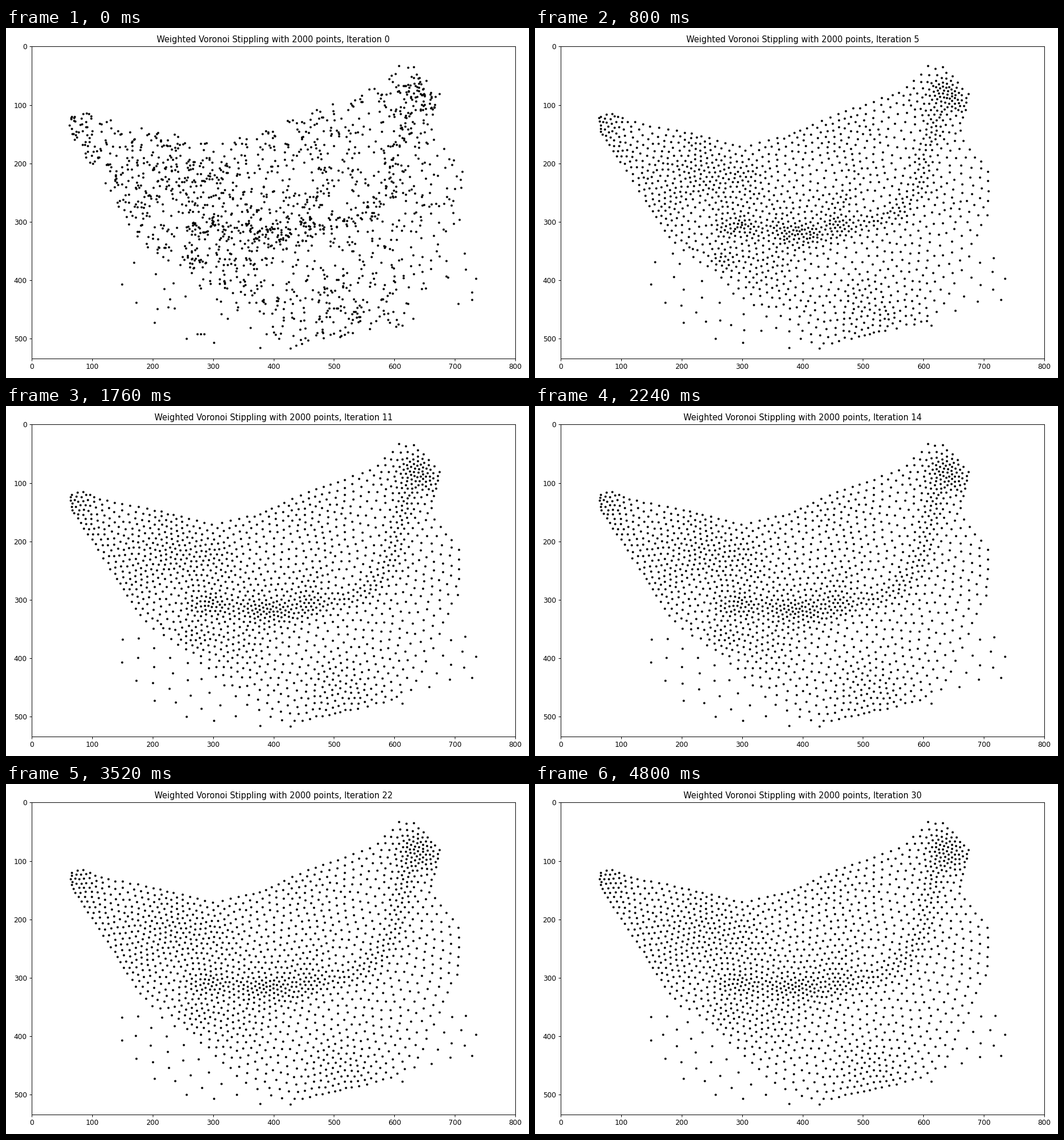
A matplotlib script for the animation above (4960 ms loop, 916 px wide and 612 px high).

```python
import numpy as np
import matplotlib.pyplot as plt
from matplotlib.animation import FuncAnimation
from matplotlib.path import Path

W, H, DPI = 916, 612, 87
COLS, ROWS = 800, 534
DOTS, STEPS, TILE = 1580, 31, 26

# Dots on the convex hull have unbounded cells and never move
HULL = [(66, 141), (66, 120), (85, 115), (607, 33), (632, 35), (674, 81),
        (735, 397), (728, 433), (613, 477), (428, 516), (378, 515), (301, 507),
        (256, 500), (203, 472), (173, 438), (149, 407)]
BODY = [(62, 145), (62, 116), (85, 111), (110, 122), (163, 132), (220, 146),
        (300, 166), (381, 146), (454, 111), (564, 70), (607, 29), (636, 31),
        (678, 80), (665, 150), (714, 212), (712, 290), (640, 445), (600, 474),
        (428, 518), (345, 480), (255, 386), (180, 336)]
SPINE = [(270, 311), (440, 316), (530, 296), (575, 262), (600, 215), (613, 150), (625, 70)]
# x, y, spread, weight
SPOTS = [(642, 82, 20, 15), (88, 130, 20, 4), (195, 240, 50, 2.5), (275, 358, 22, 6),
         (345, 395, 40, 3.5), (500, 462, 38, 4), (425, 312, 30, 2.5)]


def bell(d2, spread):
    return np.exp(-d2 / (2 * spread ** 2))


def fade(t, edge, soft):
    return 1 / (1 + np.exp((t - edge) / soft))


def density():
    """Pixels inside the shape and how dark each one is."""
    y, x = np.mgrid[:ROWS, :COLS]
    xy = np.column_stack([x.ravel(), y.ravel()]).astype(float)
    body = Path(BODY).contains_points(xy)
    skirt = Path(HULL).contains_points(xy) & (xy[:, 1] > 350)
    keep = body | skirt
    xy, body = xy[keep], body[keep]
    x, y = xy.T

    tone = 2.5 + 2.6 * fade(x, 480, 20) * fade(y, 335, 10)
    for cx, cy, spread, weight in SPOTS:
        tone += weight * bell((x - cx) ** 2 + (y - cy) ** 2, spread)
    t = np.linspace(0, len(SPINE) - 1, 70)
    d2 = np.full(len(xy), np.inf)
    for px, py in zip(*(np.interp(t, range(len(SPINE)), c) for c in zip(*SPINE))):
        d2 = np.minimum(d2, (x - px) ** 2 + (y - py) ** 2)
    tone += 7.5 * bell(d2, 11)
    return xy, np.where(body, tone, 0.55)


def split(xy, rho):
    """Sort the pixels into square tiles with a centre and radius."""
    key = (xy // TILE) @ (1, 100)
    tiles = []
    for k in np.unique(key):
        i = key == k
        mid = xy[i].mean(0)
        tiles.append((xy[i], rho[i], mid, np.hypot(*(xy[i] - mid).T).max()))
    return tiles


def relax(pts, tiles):
    """Move each free dot to the weighted centroid of its Voronoi cell."""
    mass = np.zeros((3, len(pts)))
    for xy, rho, mid, rad in tiles:
        d = np.hypot(*(pts - mid).T)
        near = np.flatnonzero(d <= d.min() + 2 * rad)
        q = pts[near] - mid
        own = ((q ** 2).sum(1) - 2 * (xy - mid) @ q.T).argmin(1)
        for row, w in zip(mass, (rho, rho * xy[:, 0], rho * xy[:, 1])):
            row[near] += np.bincount(own, w, len(near))
    new = pts.copy()
    free = mass[0] > 0
    free[:len(HULL)] = False
    new[free] = (mass[1:, free] / mass[0, free]).T
    return new


rng = np.random.default_rng(7)
xy, rho = density()
tiles = split(xy, rho)
pick = rng.choice(len(xy), DOTS - len(HULL), replace=False, p=rho / rho.sum())
states = [np.vstack([HULL, xy[pick]])]
while len(states) < STEPS:
    states.append(relax(states[-1], tiles))

fig = plt.figure(figsize=((W + 1e-6) / DPI, (H + 1e-6) / DPI), dpi=DPI, facecolor="white")
ax = fig.add_axes([45 / W, 1 - 578 / H, 847 / W, 545.6 / H])
ax.set_xlim(0, COLS)
ax.set_ylim(ROWS, 0)
title = ax.set_title("")
dots = ax.scatter(*states[0].T, s=10.5, c="black", linewidths=0)


def draw(i):
    dots.set_offsets(states[i])
    title.set_text(f"Weighted Voronoi Stippling with 2000 points, Iteration {i}")
    return dots, title


anim = FuncAnimation(fig, draw, frames=STEPS, interval=160, repeat=True, repeat_delay=0)
plt.show()
```
